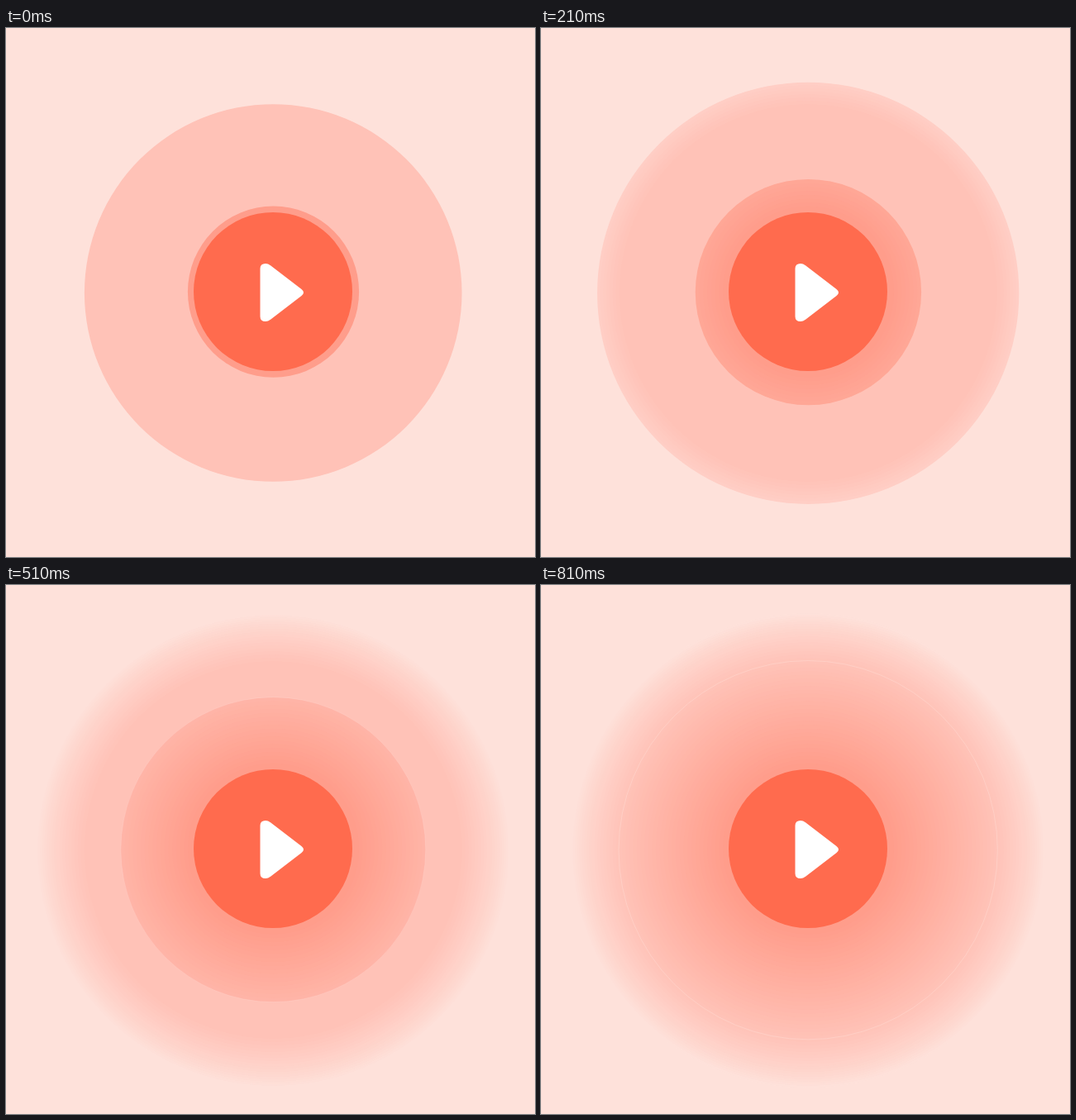
Recreate the animation shown at these times as an HTML page with a canvas. Size 640 by 640 pixels, loop 0.84 s.

```html
<!DOCTYPE html>
<html lang="en">
<head>
<meta charset="utf-8">
<title>Pulsing play button</title>
<style>
  html, body { margin: 0; width: 100%; height: 100%; overflow: hidden; background: #fee1da; }
  canvas { display: block; }
</style>
</head>
<body>
<canvas id="stage" width="640" height="640"></canvas>
<script>
const ctx = document.getElementById('stage').getContext('2d');
const STEP = 30, STEPS = 28, OUTER_STEPS = 18;
const BACK = [254, 225, 218], HALO = [255, 194, 183], GLOW = [255, 157, 139];
const play = new Path2D(
  'M307.5 291Q307.5 285 314 285Q317 285 320 287.3L357.5 316Q362.5 320 357.5 324' +
  'L320 352.7Q317 355 314 355Q307.5 355 307.5 349Z');

const mix = (a, b, t) => `rgb(${a.map((v, i) => Math.round(v + (b[i] - v) * t))})`;

const outer = i => ({
  x: 323.2, y: 320.5 + 0.045 * i,
  r: 228.3 + 4.2 * i - 0.052 * i * i,
  color: mix(HALO, BACK, i / OUTER_STEPS)
});

const inner = i => ({
  x: 323.5 - 0.012 * i, y: 319.2 + 0.055 * i,
  r: 103.6 + i * (4.62 + 0.02 * i - 0.0007 * i * i),
  color: mix(GLOW, HALO, i / (STEPS - 1))
});

function disc({ x, y, r, color }) {
  ctx.beginPath();
  ctx.arc(x, y, r, 0, 2 * Math.PI);
  ctx.fillStyle = color;
  ctx.fill();
}

// Each ring keeps the colour the wave had when it passed.
function trail(wave, last) {
  for (let i = last; i >= 0; i--) disc(wave(i));
}

function draw() {
  const k = Math.floor(performance.now() / STEP) % STEPS;
  ctx.fillStyle = mix(BACK, BACK, 0);
  ctx.fillRect(0, 0, 640, 640);
  trail(outer, Math.min(k, OUTER_STEPS));
  trail(inner, k);

  // A faint light rim appears as the inner wave fades.
  if (k > 13) {
    const { x, y, r } = inner(k);
    ctx.beginPath();
    ctx.arc(x, y, r, 0, 2 * Math.PI);
    ctx.strokeStyle = `rgba(255, 215, 207, ${Math.min(0.6, (k - 13) * 0.08)})`;
    ctx.lineWidth = 1;
    ctx.stroke();
  }

  disc({ x: 323, y: 319, r: 96, color: '#ff6b4e' });
  ctx.fillStyle = '#fff';
  ctx.fill(play);
  requestAnimationFrame(draw);
}
draw();
</script>
</body>
</html>
```
